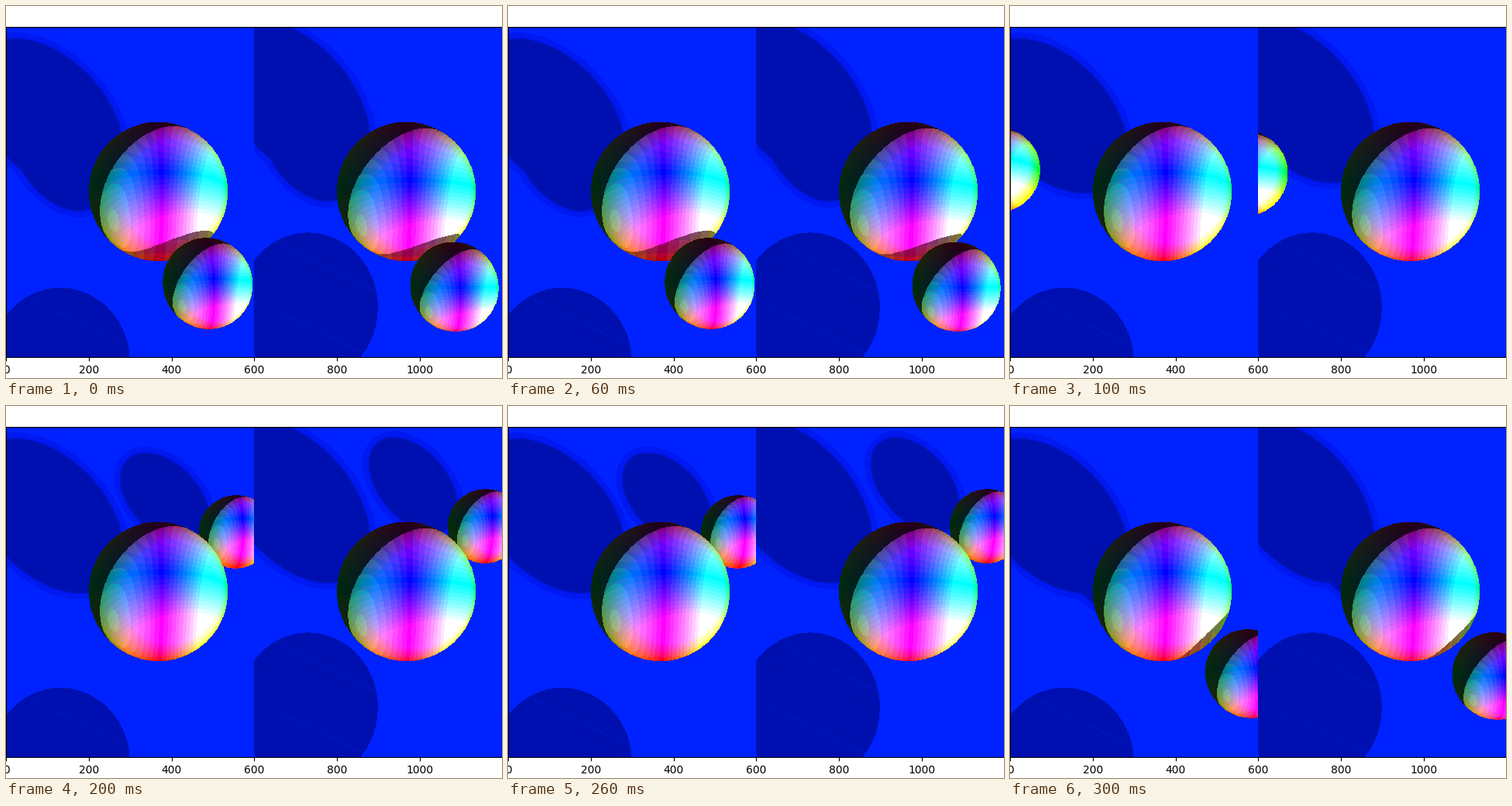
A matplotlib script that plays this animation: 640x480 px, repeating every 400 ms.

```python
import numpy as np
import matplotlib.pyplot as plt
from matplotlib.animation import FuncAnimation

W, H = 600, 800              # one view, in image pixels
SCALE = 640 / 1200           # stage pixels per image pixel
FOCAL, CX, CY = 700, 160, 213
HOME = np.array([0.4055, 0.2985, 7.884])   # big ball, seen from the camera
BIG, SMALL = 1, 0.585        # ball radii
WALL_GAP, WALL_SLOPE = 1.64, 0.17
LIGHT = np.ones(3) / np.sqrt(3)
WALL = np.array([0, 34, 255]) / 255
RING = np.array([0, 25, 241]) / 255
DARK = np.array([0, 16, 176]) / 255
AMBIENT, DIFFUSE, UNLIT = 0.69, 1.35, 0.17

# Camera tilt, half height of the big shadow, height of the lower disc
VIEWS = [(0.284, 99, 460.5), (0.180, 104, 389.5)]

# Stops of the small ball around the big one: right, down, toward the viewer
STOPS = np.array([
    (0.612, 1.336, 0.378),
    (-2.283, -0.171, 0.519),
    (1.291, -1.118, -0.545),
    (1.145, 1.198, 0.255),
])

X, Y = np.meshgrid((np.arange(W) + 0.5) * SCALE,
                   (np.arange(H) + 0.5) * SCALE + 26.67)
RAYS = np.stack([(X - CX) / FOCAL, (Y - CY) / FOCAL, np.ones_like(X)], -1)


def world_axes(tilt):
    """Rows: the world axes as the tilted camera sees them."""
    s, c = np.sin(tilt), np.cos(tilt)
    return np.array([[1, 0, 0], [0, c, -s], [0, -s, -c]])


def to_screen(world, axes):
    x, y, z = HOME + world @ axes
    return CX + FOCAL * x / z, CY + FOCAL * y / z


def cast_on_wall(p):
    """Slide a point down the diagonal light onto the slanted wall."""
    return p - (p[2] + WALL_GAP - WALL_SLOPE * p[0]) / (1 - WALL_SLOPE)


def edge_distance(center, size, tall):
    """Signed distance in stage pixels to a slanted shadow ellipse."""
    x, y = X - center[0], Y - center[1]
    sxx, syy, sxy = 97 ** 2, tall ** 2, 0.42 * tall ** 2
    det = (sxx * syy - sxy ** 2) * size ** 2
    gx = (syy * x - sxy * y) / det
    gy = (sxx * y - sxy * x) / det
    e = np.sqrt(x * gx + y * gy)
    return (e - 1) * e / np.maximum(np.hypot(gx, gy), 1e-9)


def draw_wall(img, balls, axes, tall):
    dist = np.min([
        edge_distance(to_screen(cast_on_wall(p), axes), r, tall)
        for p, r in balls], axis=0)
    img[:] = WALL
    img[dist < 8.5] = RING
    img[dist < 1.5] = (RING + DARK) / 2
    img[dist < 0] = DARK


def draw_disc(img, cy, rng):
    """Dark disc with a few bright specks and two broken cracks."""
    u, v = (X - 70) / 90, (Y - cy) / 96.5
    disc = u ** 2 + v ** 2 < 1
    img[disc] = DARK
    specks = rng.random(X.shape) < 0.0006
    for offset in (-0.66, 0.25):
        specks |= abs(v - 0.45 * u - offset) < 0.004
    specks &= rng.random(X.shape) < 0.6
    img[disc & specks] = (DARK + WALL) / 2


def draw_ball(img, ball, other, axes):
    center, radius = HOME + ball[0] @ axes, ball[1]
    a = (RAYS ** 2).sum(-1)
    b = RAYS @ center
    root = b ** 2 - a * (center @ center - radius ** 2)
    hit = root > 0
    t = (b[hit] - np.sqrt(root[hit])) / a[hit]
    point = (RAYS[hit] * t[:, None] - HOME) @ axes.T
    normal = (point - ball[0]) / radius
    facing = normal @ LIGHT

    to_other = other[0] - point
    along = to_other @ LIGHT
    miss = (to_other ** 2).sum(-1) - along ** 2
    blocked = (along > 0) & (miss < other[1] ** 2)

    # Red follows height, green follows width, blue follows depth
    tint = abs(normal)[:, [1, 0, 2]]
    gain = AMBIENT + DIFFUSE * np.where(blocked, 0, facing)
    lit = np.clip(np.round(tint * gain[:, None] * 10) / 10, 0, 1)
    img[hit] = np.where((facing > 0)[:, None], lit, tint * UNLIT)


def render(stop):
    rng = np.random.default_rng(7)
    balls = [(np.zeros(3), BIG), (stop, SMALL)]
    halves = []
    for tilt, tall, disc_y in VIEWS:
        img = np.empty((H, W, 3))
        axes = world_axes(tilt)
        draw_wall(img, balls, axes, tall)
        draw_disc(img, disc_y, rng)
        far, near = sorted(balls, key=lambda b: -(b[0] @ axes)[2])
        draw_ball(img, far, near, axes)
        draw_ball(img, near, far, axes)
        halves.append(img)
    return np.hstack(halves)


images = [render(stop) for stop in STOPS]

fig = plt.figure(figsize=(6.4, 4.8), dpi=100)
ax = fig.add_axes([0, 0, 1, 1])
picture = ax.imshow(images[0], interpolation="nearest")


def update(i):
    picture.set_data(images[i])
    return [picture]


anim = FuncAnimation(fig, update, frames=len(images), interval=100,
                     repeat=True, repeat_delay=0, blit=False)
plt.show()
```
